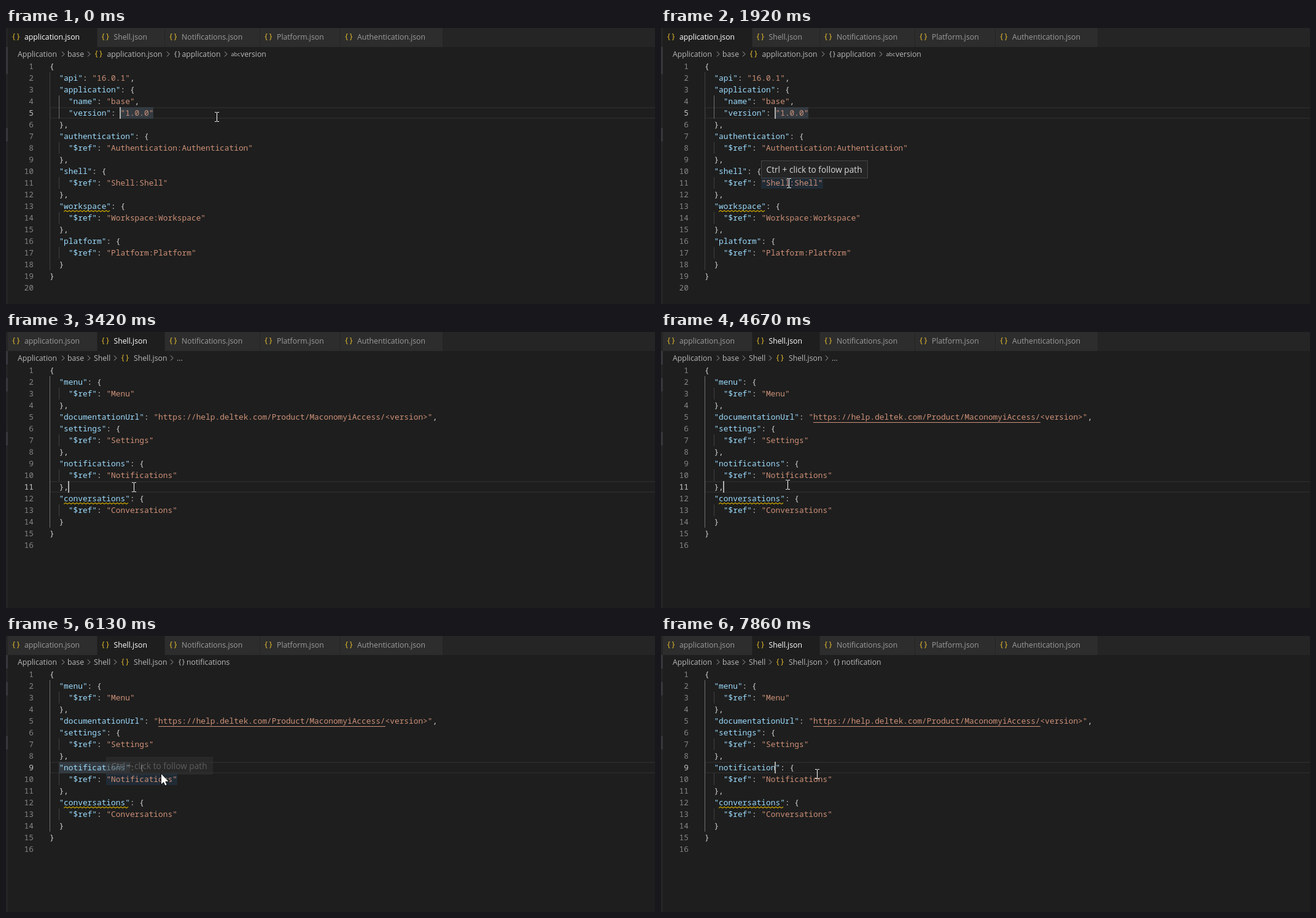
Animation of 1057x450 px, one loop 8 s. Source, as an HTML page with a canvas:

```html
<!DOCTYPE html>
<html lang="en">
<head>
<meta charset="utf-8">
<title>Editor</title>
<style>
  html, body { margin: 0; width: 100%; height: 100%; overflow: hidden; background: #1e1e1e; }
  canvas { display: block; }
</style>
</head>
<body>
<canvas id="stage" width="1057" height="450"></canvas>
<script>
const ctx = document.getElementById('stage').getContext('2d');
const LOOP = 8000, LEFT = 71, CHAR = 7.7, ROW = 19;
const MONO = '500 12.83px "Noto Sans Mono", monospace';
const UI = '12.25px "Open Sans", sans-serif';
const GREY = '#d4d4d4', KEY = '#9cdcfe', STR = '#ce9178', LINK = '#4e94ce';
const HOVER = 'rgba(38,79,120,.25)', WORD = '#333a40';

const appCode = `{
  "api": "16.0.1",
  "application": {
    "name": "base",
    "version": "1.0.0"
  },
  "authentication": {
    "$ref": "Authentication:Authentication"
  },
  "shell": {
    "$ref": "Shell:Shell"
  },
  "workspace": {
    "$ref": "Workspace:Workspace"
  },
  "platform": {
    "$ref": "Platform:Platform"
  }
}
`.split('\n');

const shellCode = `{
  "menu": {
    "$ref": "Menu"
  },
  "documentationUrl": "https://help.deltek.com/Product/MaconomyiAccess/<version>",
  "settings": {
    "$ref": "Settings"
  },
  "notifications": {
    "$ref": "Notifications"
  },
  "conversations": {
    "$ref": "Conversations"
  }
}
`.split('\n');

const tabs = [
  ['application.json', 3, 148, 30], ['Shell.json', 149, 258, 175.5],
  ['Notifications.json', 259, 413, 286], ['Platform.json', 414, 544, 441],
  ['Authentication.json', 545, 711, 572]
];

// Pointer moves: start, end, steps, from x, y, to x, y
const moves = [
  [750, 1450, 10, 343, 145, 208, 253],
  [4670, 4970, 5, 208, 253, 190, 210],
  [5230, 5370, 3, 190, 210, 190, 212],
  [5530, 5900, 6, 190, 212, 254, 225]
];
const blinks = [440, 940, 1440, 1920, 2470, 3250, 3890, 4360, 4890, 5370, 5900, 6310, 6770, 6920, 7400, 7860];

const hand = new Path2D('M5 1.5C5-.3 8-.3 8 1.5V7C8 5.9 11 6.2 11 7.6C11 6.7 13.5 7 13.5 8.5C13.5 7.6 15.5 8 15.5 9.5V14C15.5 17 13 18 13 21H6C6 18 2 15 .8 12.5C0 10.5 2.5 9.5 4 11.5L5 12.5Z');
const arrow = new Path2D('M0 0V16.5L3.8 13 6.3 18.5 8.7 17.4 6.3 12H11.5Z');

const colX = c => LEFT + c * CHAR;
const rowY = n => 53 + (n - 1) * ROW;
const within = (t, a, b) => t >= a && t < b;

function box(x, y, w, h, color) {
  ctx.fillStyle = color;
  ctx.fillRect(x, y, w, h);
}

function text(s, x, y, color, font = UI, align = 'left') {
  ctx.font = font;
  ctx.textAlign = align;
  ctx.fillStyle = color;
  ctx.fillText(s, x, y);
}

function braces(x, y, gap, color, font) {
  text('{', x, y, color, font, 'center');
  text('}', x + gap, y, color, font, 'center');
}

const jsonIcon = (x, y) => braces(x + 3, y, 7.5, '#e2bb2c', '500 12px "Noto Sans Mono", monospace');

function codeLine(s, x, y, stringColor = STR) {
  for (const m of s.matchAll(/"[^"]*"|[^"]+/g)) {
    const isKey = s[m.index + m[0].length] === ':';
    const color = m[0][0] !== '"' ? GREY : isKey ? KEY : stringColor;
    text(m[0], x + m.index * CHAR, y, color, MONO);
  }
}

function mark(row, col, len, color) {
  const x = Math.floor(colX(col));
  box(x, rowY(row), Math.round(colX(col + len)) - x, ROW, color);
}

function underline(row, col, len, color) {
  box(Math.round(colX(col)), rowY(row) + 18, Math.round(len * CHAR), 1, color);
}

function squiggle(row, col, len) {
  const y = rowY(row) + 16;
  ctx.beginPath();
  for (let x = colX(col), i = 0; x <= colX(col + len); x += 3, i++) ctx.lineTo(x, y + (i % 2 ? 0.5 : 2.5));
  ctx.strokeStyle = '#cca700';
  ctx.lineWidth = 1.1;
  ctx.stroke();
}

function chevrons(xs) {
  ctx.strokeStyle = '#a9a9a9';
  ctx.lineWidth = 1;
  for (const x of xs) {
    ctx.beginPath();
    ctx.moveTo(x - 2, 38.5);
    ctx.lineTo(x + 2, 42.5);
    ctx.lineTo(x - 2, 46.5);
    ctx.stroke();
  }
}

function drawTabs(active, dirty) {
  box(0, 0, 1057, 31, '#252526');
  tabs.forEach(([name, x, end, tx], i) => {
    box(x, 0, end - x, 31, i === active ? '#1e1e1e' : '#2d2d2d');
    jsonIcon(tx - 20.5, 18);
    text(name, tx, 19, i === active ? '#fff' : '#9c9c9c');
  });
  if (dirty) {
    ctx.beginPath();
    ctx.arc(243, 15, 4.5, 0, 7);
    ctx.fillStyle = '#fff';
    ctx.fill();
  }
}

function drawSidebar(shell, t) {
  box(0, 0, 3, 450, '#252526');
  const rows = shell ? [[31, 22], [75, 22], [163, 22]] : [[31, 44], [163, 22]];
  for (const [y, h] of rows) box(0, y, 3, h, '#37373d');
  if (within(t, 3490, 4360)) box(0, 228, 3, 222, 'rgba(121,121,121,.4)');
}

function drawPath(shell, symbol) {
  const put = (s, x) => text(s, x, 47, '#b8b8b8');
  const symbolIcon = x => braces(x, 46, 6, '#c5c5c5', '11px "Noto Sans Mono", monospace');
  put('Application', 19);
  put('base', 100);
  if (shell) {
    put('Shell', 143);
    jsonIcon(187, 46);
    put('Shell.json', 208);
    chevrons([93, 135, 178, 270]);
    put(symbol || '...', symbol ? 294 : 278);
    if (symbol) symbolIcon(283);
  } else {
    jsonIcon(144, 46);
    put('application.json', 164.5);
    symbolIcon(276);
    put('application', 286.5);
    text('abc', 366.5, 46, '#c5c5c5', '9px "Open Sans", sans-serif');
    put('version', 382);
    chevrons([93, 135, 264, 358]);
  }
}

function drawGuides(lines, shell) {
  lines.forEach((s, i) => {
    const depth = s.search(/\S/), y = rowY(i + 1);
    if (depth >= 2) box(71, y, 1, ROW, shell ? '#707070' : '#404040');
    if (depth >= 4) box(86, y, 1, ROW, !shell && i < 5 ? '#707070' : '#404040');
  });
}

function panel(x, y, w, h) {
  box(x, y, w, h, '#454545');
  box(x + 1, y + 1, w - 2, h - 2, '#252526');
}

function hint(x, y) {
  text('Ctrl + click to follow path', x + 8.5, y + 20, '#d8d8d8', '13.7px "Open Sans", sans-serif');
}

function tooltip(row, col, alpha) {
  const x = Math.floor(colX(col)), y = rowY(row) - 27;
  ctx.globalAlpha = alpha;
  panel(x, y, 174, 29);
  hint(x, y);
  ctx.globalAlpha = 1;
}

function preview() {
  panel(163, 112, 226, 133);
  box(164, 216, 224, 1, '#353535');
  const put = (s, col, y, color) => text(s, 172 + col * CHAR, y, color, MONO);
  put('},', 0, 131, GREY);
  put('"conversations"', 2, 150, STR);
  put(': {', 17, 150, GREY);
  codeLine('    "$ref": "Conversations"', 172, 169);
  put('}', 2, 188, GREY);
  put('}', 0, 207, GREY);
  hint(163, 216);
}

function pointerAt(t) {
  let pos = [343, 145];
  for (const [a, b, n, x0, y0, x1, y1] of moves) {
    if (t < a) break;
    const k = Math.min(n, Math.floor((t - a) / (b - a) * (n - 1) + 1e-6) + 1) / n;
    const e = k * k * (3 - 2 * k);
    pos = [Math.round(x0 + (x1 - x0) * e), Math.round(y0 + (y1 - y0) * e)];
  }
  return pos;
}

function shape(path, x, y) {
  ctx.save();
  ctx.translate(x, y);
  ctx.fillStyle = '#fff';
  ctx.strokeStyle = '#000';
  ctx.lineWidth = 1.5;
  ctx.stroke(path);
  ctx.fill(path);
  ctx.restore();
}

function drawPointer(t) {
  const [x, y] = pointerAt(t);
  if (within(t, 2470, 3250)) return shape(hand, x - 6, y);
  if (within(t, 6130, 6310)) return shape(arrow, x - 1, y);
  for (const dy of [-8, 7]) {
    box(x - 3, y + dy, 3, 1, '#fff');
    box(x + 1, y + dy, 3, 1, '#fff');
  }
  box(x, y - 7, 1, 14, '#fff');
}

function draw(t) {
  const shell = t >= 3250, clicked = t >= 5460, edited = t >= 6920;
  const lines = shell ? shellCode.slice() : appCode;
  if (edited) lines[8] = lines[8].replace('notifications', 'notification');
  const row = !shell ? 5 : clicked ? 9 : 11;
  const col = !shell || edited ? 15 : clicked ? 16 : 4;
  const linked = within(t, 2470, 3250);

  box(0, 0, 1057, 450, '#1e1e1e');
  drawTabs(shell ? 1 : 0, within(t, 6920, 7780));
  drawSidebar(shell, t);
  drawPath(shell, t < 5680 ? '' : t < 7230 ? 'notifications' : 'notification');

  box(71, rowY(row), 986, ROW, '#282828');
  box(73, rowY(row) + 2, 984, ROW - 4, '#1e1e1e');

  if (!shell) mark(5, 15, 7, WORD);
  if (within(t, 1680, 3250)) mark(11, 12, 13, HOVER);
  if (within(t, 5230, 5460)) mark(9, 2, 15, HOVER);
  if (within(t, 5750, 6920)) mark(9, 2, 15, WORD);
  if (within(t, 6130, 6310)) mark(10, 12, 15, HOVER);

  drawGuides(lines, shell);
  lines.forEach((s, i) => {
    const y = rowY(i + 1) + 14;
    text(i + 1, 45, y, i + 1 === row ? '#c6c6c6' : '#858585', MONO, 'right');
    codeLine(s, LEFT, y, linked && i === 10 ? LINK : STR);
  });

  if (linked) underline(11, 12, 13, LINK);
  if (t >= 3490) underline(5, 23, 48, STR);
  if (!shell) squiggle(13, 3, 10);
  else if (t >= 3420) squiggle(12, 3, 14);

  if (blinks.filter(b => t >= b).length % 2 === 0)
    box(Math.floor(70.3 + col * CHAR), rowY(row), 2, ROW, '#aeafad');

  if (within(t, 1680, 2790)) tooltip(11, 12, t < 1750 ? 0.5 : 1);
  if (within(t, 2790, 3250)) preview();
  if (within(t, 5230, 5460)) tooltip(9, 2, t < 5300 ? 0.5 : 1);
  if (within(t, 6130, 6270)) tooltip(10, 12, 0.3);
  drawPointer(t);
}

const start = performance.now();
function tick() {
  draw((performance.now() - start) % LOOP);
  requestAnimationFrame(tick);
}
tick();
</script>
</body>
</html>
```
